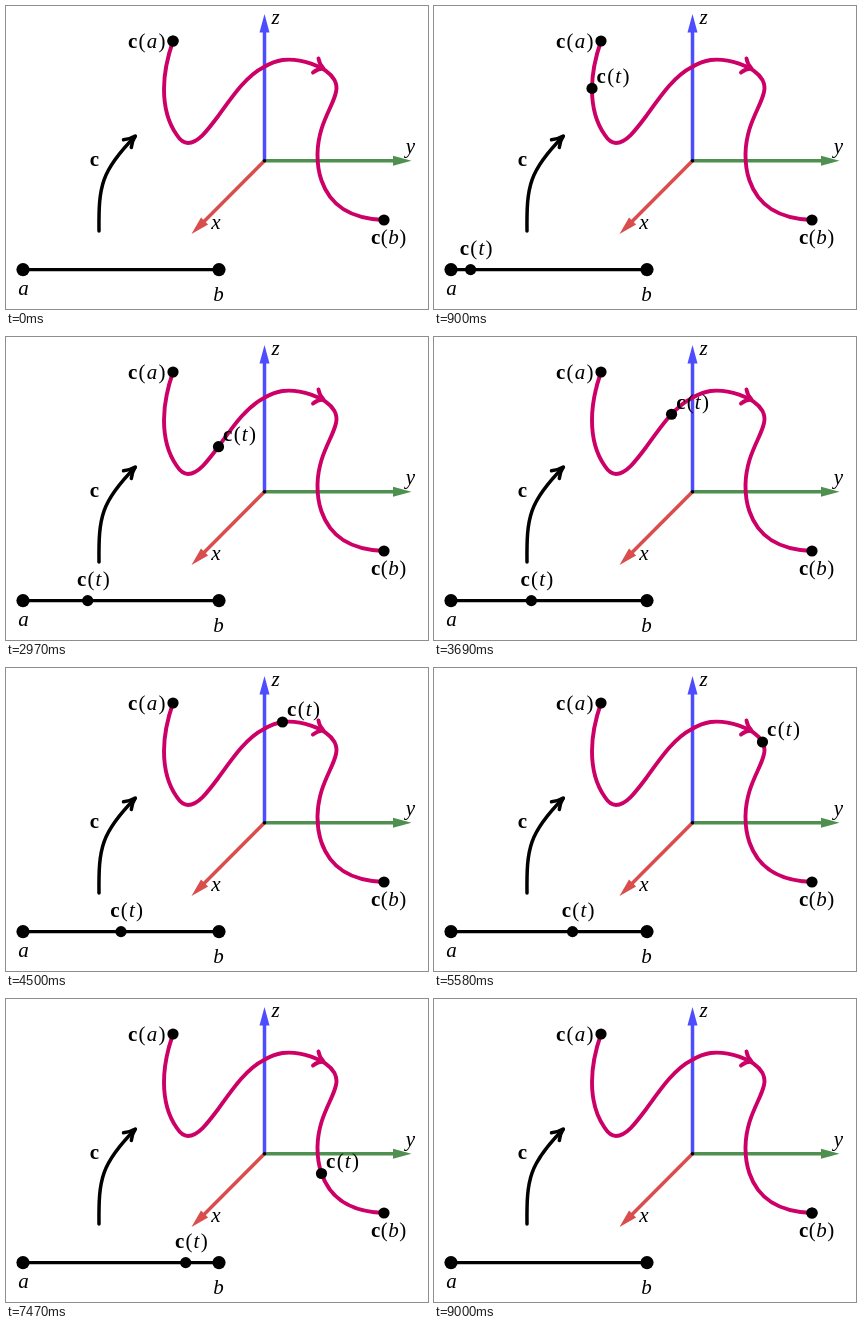
An HTML page for the animation above (9090 ms loop, 422 by 303 pixels).

```html
<!DOCTYPE html>
<html lang="en">
<head>
<meta charset="utf-8">
<title>Parametrized curve</title>
<style>
  html, body { margin: 0; width: 100%; height: 100%; overflow: hidden; background: #fff; }
  svg { display: block; width: 422px; height: 303px; }
  text { font: 21px "Liberation Serif", "Times New Roman", serif; letter-spacing: 1.2px; }
  .v { font-style: italic; }
  .m { text-anchor: middle; letter-spacing: 0; }
  .b { font-weight: bold; }
  .pen { fill: none; stroke-linecap: round; stroke-linejoin: round; }
</style>
</head>
<body>
<svg viewBox="0 0 422 303">
  <g stroke-width="3.5">
    <g stroke="#4f8f4f" fill="#4f8f4f">
      <path d="M258.5 154.8H390"/>
      <path stroke="none" d="M405.5 154.8L387 149.8V159.8Z"/>
    </g>
    <g stroke="#d94d4d" fill="#d94d4d">
      <path d="M258.5 154.8L197 216.5"/>
      <path stroke="none" d="M185.5 228L195 211.4L202.1 218.5Z"/>
    </g>
    <g stroke="#4d4dff" fill="#4d4dff">
      <path d="M258.5 154.8V24"/>
      <path stroke="none" d="M258.5 8L253.5 26.5H263.5Z"/>
    </g>
  </g>
  <circle cx="258.5" cy="154.8" r="1.8"/>

  <g class="pen" stroke="#cc0066" stroke-width="3.9">
    <path id="curve"/>
    <path d="M312.5 52.5Q313.5 58.5 317.5 62.3Q311.5 63 307 66.5"/>
  </g>
  <g class="pen" stroke="#000" stroke-width="3.5">
    <path d="M93 225C92.5 180 95 165 129 130.5"/>
    <path d="M117.5 133.8Q124 133.2 129.3 130Q126 135 125.3 141.5"/>
    <path stroke-width="3.1" d="M17 263.6H213"/>
  </g>

  <circle cx="17" cy="263.6" r="6.6"/>
  <circle cx="213" cy="263.6" r="6.6"/>
  <circle cx="167" cy="35" r="5.6"/>
  <circle cx="378" cy="214" r="5.6"/>

  <text class="v m" x="17.5" y="289">a</text>
  <text class="v m" x="212.5" y="295">b</text>
  <text class="v m" x="210" y="223">x</text>
  <text class="v m" x="404.5" y="147">y</text>
  <text class="v m" x="269.5" y="18">z</text>
  <text class="b m" x="88.5" y="160">c</text>
  <text x="122" y="41.5"><tspan class="b">c</tspan>(<tspan class="v">a</tspan>)</text>
  <text x="365" y="238" style="letter-spacing:.5px"><tspan class="b">c</tspan>(<tspan class="v">b</tspan>)</text>

  <g id="onLine">
    <circle r="5.6"/>
    <text x="-10.8" y="-14.5"><tspan class="b">c</tspan>(<tspan class="v">t</tspan>)</text>
  </g>
  <g id="onCurve">
    <circle r="5.6"/>
    <text x="4.6" y="-5.7"><tspan class="b">c</tspan>(<tspan class="v">t</tspan>)</text>
  </g>
</svg>
<script>
const STEP = 90, STEPS = 101;
const $ = id => document.getElementById(id);

// Each piece of the curve: parameter at its end, then its Bezier commands.
const pieces = [
  [0.20, "C162.5 48 158 65 158 83C158 100 162.5 117 170.5 128.5"],
  [0.33, "C174 134 177.5 137 182 137C192 137 201 125 212.5 109.7"],
  [0.50, "C226 91 240 70 258 61C264 57.5 270 55 276.5 54"],
  [0.62, "C292 52 320 59 328.5 74"],
  [0.83, "C330.5 78 331 82 330 86C327 101 312 118 311.5 148C311.4 157 312.5 166 315.5 174.5"],
  [1.00, "C324 199 343 212.5 378 214"]
];

// Build the path and note the arc length reached at each parameter.
const curve = $("curve");
const marks = [[0, 0]];
let d = "M167 35";
for (const [t, part] of pieces) {
  d += part;
  curve.setAttribute("d", d);
  marks.push([t, curve.getTotalLength()]);
}

function lengthAt(t) {
  const i = Math.max(1, marks.findIndex(m => t <= m[0]));
  const [t0, s0] = marks[i - 1], [t1, s1] = marks[i];
  return s0 + (s1 - s0) * (t - t0) / (t1 - t0);
}

function place(id, x, y, labelled) {
  const g = $(id);
  g.setAttribute("transform", `translate(${x} ${y})`);
  g.lastElementChild.style.display = labelled ? "" : "none";
}

function draw() {
  const k = Math.floor(performance.now() / STEP) % STEPS;
  const t = k / (STEPS - 1);
  const labelled = t > 0 && t < 1;
  const p = curve.getPointAtLength(lengthAt(t));
  place("onLine", 17 + 196 * t, 263.6, labelled);
  place("onCurve", p.x, p.y, labelled);
  requestAnimationFrame(draw);
}
draw();
</script>
</body>
</html>
```
